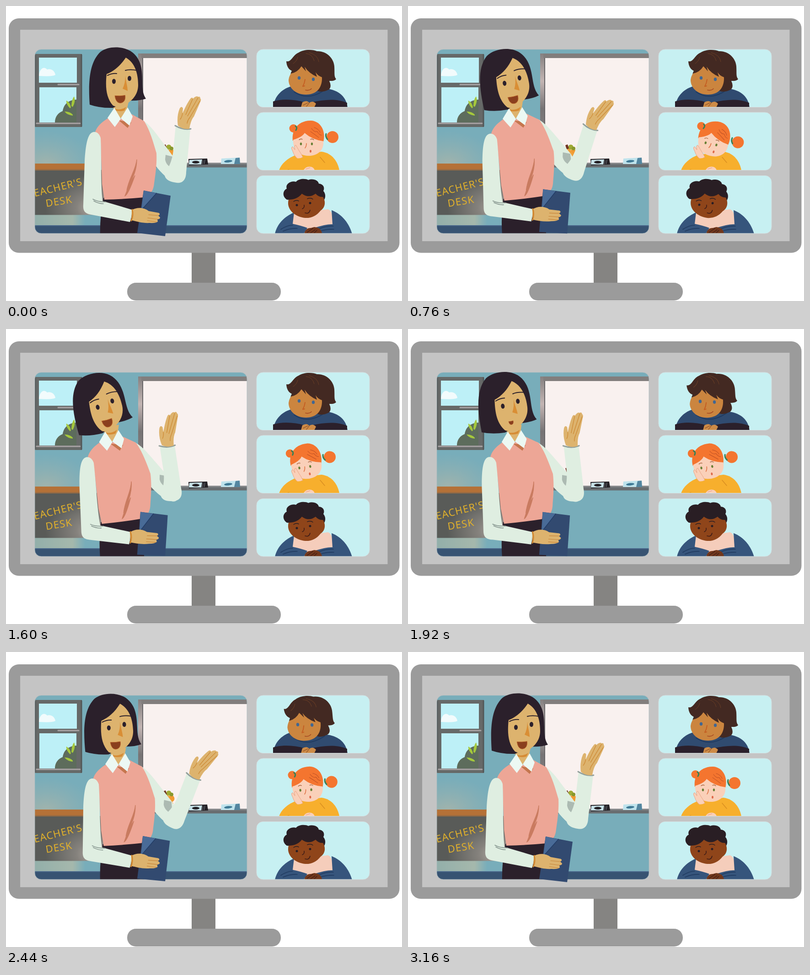
Recreate the animation shown at these times as an HTML page. Size 866 by 646 pixels, loop 3200 ms.

```html
<!DOCTYPE html>
<html lang="en">
<head>
<meta charset="utf-8">
<title>Online class</title>
<style>
  html, body { margin: 0; width: 100%; height: 100%; overflow: hidden; background: #fff; }
  svg { display: block; width: 866px; height: 646px; }
  .line { fill: none; stroke-linecap: round; stroke-linejoin: round; }
  .chalk { fill: #e0b02c; font: 500 22px "Noto Sans", "Open Sans", sans-serif; letter-spacing: 1.2px; }
  .skin { fill: #ddb36e; }
  .cloth { fill: #dfeee1; }
  .ink { fill: #2b202b; }
</style>
</head>
<body>
<svg viewBox="0 0 866 646">
  <defs>
    <clipPath id="room"><rect x="63" y="95" width="464" height="403" rx="14"/></clipPath>
    <clipPath id="tiles">
      <rect x="548" y="95" width="247" height="126.500" rx="14"/>
      <rect x="548" y="233" width="247" height="126.500" rx="14"/>
      <rect x="548" y="371.500" width="247" height="126.500" rx="14"/>
    </clipPath>
    <radialGradient id="deskFill" cx=".9" cy=".85" r=".75">
      <stop offset="0" stop-color="#b9b0a9"/><stop offset=".4" stop-color="#85827d"/>
      <stop offset="1" stop-color="#595b58"/>
    </radialGradient>
    <linearGradient id="edgeFill" x2="0" y2="1">
      <stop offset="0" stop-color="#858080"/><stop offset=".25" stop-color="#c3b5b3"/>
      <stop offset=".5" stop-color="#777475"/><stop offset="1" stop-color="#8b8788"/>
    </linearGradient>
    <radialGradient id="haze" cx=".2" cy="1" r=".9">
      <stop offset="0" stop-color="#b0b6a7" stop-opacity=".75"/>
      <stop offset="1" stop-color="#9fb2ac" stop-opacity="0"/>
    </radialGradient>
    <linearGradient id="under">
      <stop offset="0" stop-color="#93afaa"/><stop offset=".75" stop-color="#a5b8ac"/>
      <stop offset="1" stop-color="#78adba"/>
    </linearGradient>
  </defs>

  <!-- monitor -->
  <rect x="406" y="538" width="52" height="70" fill="#858482"/>
  <rect x="265" y="606" width="336" height="39" rx="19" fill="#9b9b9b"/>
  <rect x="6" y="27" width="854.500" height="513.500" rx="22" fill="#9b9b9b"/>
  <rect x="31" y="52" width="803.500" height="463" fill="#c4c4c4"/>

  <!-- classroom -->
  <g clip-path="url(#room)">
    <rect x="63" y="95" width="464" height="403" fill="#78adba"/>
    <rect x="63" y="265" width="120" height="82" fill="url(#haze)"/>
    <rect x="63" y="105" width="103" height="160" fill="#666968"/>
    <path d="M72 113H155V168H72ZM73 178H154V255H73Z" fill="#bdf0f7"/>
    <path d="M72 152C74 135 84 132 90 139C98 136 107 142 108 151Q100 155 72 153Z" fill="#f2fbfc"/>
    <path d="M107 255C107 242 114 234 124 230C126 218 133 207 152 205H154V255Z" fill="#5d6c5c"/>
    <path d="M143 219Q144 203 149 198Q153 208 146 221ZM140 224Q131 215 132 207Q140 211 142 222ZM146 240Q134 239 128 231Q140 231 146 238Z" fill="#a5c83c"/>
    <path d="M114 172H159M66 257H162" class="line" stroke="#a8a3a4" stroke-width="3"/>
    <path d="M165 107V263M64 108V262" class="line" stroke="#535757" stroke-width="3"/>

    <rect x="289" y="104" width="12" height="241" fill="url(#edgeFill)"/>
    <rect x="298" y="104" width="3" height="241" fill="#686668"/>
    <rect x="300" y="114" width="227" height="230" fill="#f9f1ef"/>
    <rect x="296" y="104" width="231" height="10" fill="#827e7d"/>
    <rect x="296" y="343.500" width="231" height="10" fill="#696d70"/>
    <path d="M296 345H527" stroke="#858789" stroke-width="3"/>

    <path d="M399 335L440 334L442 347L400 349Z" fill="#242126"/>
    <path d="M401 337L429 336L427 347H400Z" fill="#c8e2e8"/>
    <ellipse cx="415" cy="342" rx="8" ry="3" fill="#242126"/>
    <path d="M431 338L429 347M435 337L433 346" stroke="#77818a" stroke-width="1"/>
    <path d="M471 334L508 332L511 346H470Z" fill="#bfe3ec"/>
    <path d="M502 333L511 332L512 346H499Z" fill="#5386a0"/>
    <ellipse cx="486" cy="340" rx="9" ry="2.700" fill="#3f7995" transform="rotate(-5 486 340)"/>

    <circle cx="361" cy="321" r="7.500" fill="#f19a32"/>
    <path d="M347 314L352 310L366 332L360 335Z" fill="#f0a23c"/>
    <circle cx="356" cy="309" r="5.500" fill="#9eaa34"/><circle cx="362" cy="312" r="4" fill="#87972d"/>
    <path d="M344 305L349 303L352 312L347 314Z" fill="#6f3421"/>

    <rect x="63" y="457" width="110" height="24" fill="url(#under)"/>
    <rect x="63" y="359" width="152" height="98.500" fill="url(#deskFill)"/>
    <rect x="63" y="345" width="125" height="15" fill="#b57137"/>
    <path d="M63 358.500H186" stroke="#8f6a48" stroke-width="2"/>
    <text class="chalk" transform="translate(50 421) rotate(-14)">TEACHER'S</text>
    <text class="chalk" transform="translate(88 440) rotate(-9)">DESK</text>
    <rect x="63" y="480" width="464" height="18" fill="#375372"/>
    <path d="M63 481H527" stroke="#49678a" stroke-width="2"/>
    <g class="sway">
      <path class="ink" d="M213 420L302 414V510H206C205 480 207 450 213 420Z"/>
    </g>
  </g>
  <rect x="63" y="95" width="464" height="403" rx="14" fill="none" stroke="#aebdc0" stroke-width=".8"/>

  <!-- teacher -->
  <g class="sway">
    <path class="cloth" d="M298 250C314 258 330 282 343 299L366 330L388 372C386 386 377 389 369 385C353 379 340 366 328 351L310 310Z"/>
    <path d="M349 326L365 330L367 357Q350 350 348 336Z" fill="#acbab2"/>
    <path class="skin" d="M232 214L268 210L264 229L250 247L237 232Z"/>
    <path d="M235 224Q249 230 263 221L259 229Q247 232 237 228Z" fill="#d68c35"/>
    <path d="M223 246C210 254 199 263 195 276L207 300L210 390L215 424Q260 423 302 419C319 413 323 400 324 388C328 362 330 342 329 322C322 298 314 270 302 252L275 237L250 248Z" fill="#eda696"/>
    <path d="M246 250L266 267L274 255Z" fill="#c5764e"/>
    <path d="M237 223L222 245L238 265L251 247ZM266 222L251 246L270 262L277 242Z" fill="#ecf8f3"/>
    <path d="M286 336C284 359 269 376 264 404C270 386 286 369 286 336ZM282 371Q270 388 260 416Q267 414 282 371Z" fill="#c97b60" stroke="#c97b60" stroke-width="1.300"/>

    <g id="forearm">
      <path class="cloth" d="M371 263L403 270L394 364C394 382 384 389 373 387C357 385 346 379 347 367C358 352 366 332 367 304Z"/>
      <path d="M370 262Q387 272 404 269" class="line" stroke="#929f9b" stroke-width="3"/>
      <path class="skin" d="M376 262C374 249 375 236 380 224Q384 218 387 224L386 235C391 224 397 211 404 202Q408 199 409 203C412 199 418 196 420 199Q425 197 425 203Q428 204 424 212L411 242Q404 250 401 269Q387 271 376 262Z"/>
      <path class="line" d="M386 235Q385 243 381 248M408 204L393 238M420 201L397 241M424 208L402 244Q397 250 396 257" stroke="#cd8a35" stroke-width="1.300"/>
    </g>

    <path class="cloth" d="M191 276C178 278 174 306 172 340L169 436C168 451 175 455 187 457L271 473Q276 460 275 446L211 427C207 390 209 330 207 289C204 279 198 275 191 276Z"/>
    <path class="line" d="M190 423Q200 429 218 429M192 427Q203 433 213 433" stroke="#83938c" stroke-width="1.600"/>
    <path d="M301 404L360 415.500L348 504L287 497Z" fill="#324a70"/>
    <path d="M301 404L329 410L296 447Z" fill="#496b97"/>
    <path class="line" d="M329 410L296 447" stroke="#223c66" stroke-width="1.500"/>
    <path class="skin" d="M275 447C286 440 302 441 312 449L334 453Q339 456 333 459L337 463Q337 467 331 467L332 472Q327 476 315 475C299 476 286 472 274 469Z"/>
    <path class="line" d="M333 459L312 457M332 467L310 464M329 473L309 470" stroke="#c7843a" stroke-width="1.200"/>
    <path d="M276 446Q279 458 274 470" class="line" stroke="#d18730" stroke-width="3"/>
  </g>

  <g id="head">
    <path class="ink" d="M183 216C180 170 181 124 207 100C226 86 260 88 277 102C296 118 298 140 298 164C298 184 300 194 306 203Q292 208 268 207L234 223Q206 224 183 216Z"/>
    <path class="skin" d="M262 113C250 131 236 143 220 149C217 178 219 201 234 218Q247 225 259 217C276 208 289 194 289 173C289 148 282 124 262 113Z"/>
    <path class="line" d="M222 152Q232 147 242 148M261 141Q272 138 286 141" stroke="#2b202b" stroke-width="2"/>
    <ellipse class="ink" cx="236" cy="165" rx="4" ry="5.500"/>
    <ellipse class="ink" cx="270" cy="158.500" rx="4" ry="5.500"/>
    <path d="M261 152C262 165 266 176 266 186L255 181Q261 169 261 152Z" fill="#d98e35"/>
    <path id="mouth" d="M238 197Q249 198 260.500 196C262 207 257 213 249 213Q240 212 238 197Z" fill="#8a3f1e" stroke="#b9652c" stroke-width="1"/>
  </g>

  <!-- pupils -->
  <g clip-path="url(#tiles)">
    <rect x="548" y="95" width="247" height="403" fill="#c7f0f2"/>

    <path d="M584 222C587 196 605 180 627 175L694 180C724 182 744 196 747 222Z" fill="#304b70"/>
    <path class="line" d="M630 188Q660 209 697 184" stroke="#1e3a61" stroke-width="2"/>
    <path class="ink" d="M584 222V209C603 203 631 204 653 211L646 222ZM746 222V212C723 202 694 205 668 211L674 222Z"/>
    <path d="M648 211Q658 205 663 212Q671 206 678 214L674 222H645Z" fill="#cd8b47"/>
    <path class="line" d="M657 220L664 211M650 217L660 212" stroke="#8b4d24" stroke-width="1.200"/>
    <g id="pupil1">
      <path d="M613 121C624 124 627 107 640 102C652 94 671 95 680 99C701 98 717 115 718 132C719 148 717 154 722 160C718 165 709 164 707 164Q713 177 706 183Q694 189 684 187L622 154Q622 147 625 142Q614 137 613 121Z" fill="#432922"/>
      <path d="M623 148Q638 145 646 132L656 143L653 133Q662 147 680 155L677 145Q682 153 691 156C692 177 681 194 656 194C632 194 618 178 618 162Q619 154 623 148Z" fill="#cb853f"/>
      <path class="line" d="M656 104Q670 105 674 120M663 102Q682 107 684 122M628 126Q636 121 638 112" stroke="#6a3e25" stroke-width="1"/>
      <ellipse cx="641" cy="157.500" rx="3.200" ry="3.800" fill="#416792"/>
      <ellipse cx="672" cy="160.500" rx="3.200" ry="3.800" fill="#416792"/>
      <path class="line" d="M654 161Q653 169 649 176L653 175" stroke="#c45e22" stroke-width="2"/>
      <path class="line" d="M655 184Q663 186 668 181" stroke="#a54922" stroke-width="1.600"/>
    </g>

    <path d="M597 360C602 345 615 334 634 326L690 319C714 322 726 342 729 360Z" fill="#f7af2d"/>
    <path class="line" d="M687 331L697 343M617 358Q631 348 648 345" stroke="#d88d20" stroke-width="1.400"/>
    <g id="pupil2">
      <circle cx="628.500" cy="268" r="9" fill="#f4752f"/>
      <circle cx="714" cy="287" r="13" fill="#f4752f"/>
      <path d="M627 295C624 268 642 250 668 251C690 253 701 277 693 301Z" fill="#f4752f"/>
      <path d="M628 293Q648 287 653 278Q670 293 694 296C696 316 681 329 660 328C640 327 627 314 628 293Z" fill="#fad0b9"/>
      <path class="line" d="M633 263Q638 266 634 272M700 280Q698 286 703 292" stroke="#368057" stroke-width="3"/>
      <path class="line" d="M668 268Q674 277 681 275Q684 282 690 283M674 266Q684 269 687 277M666 275Q675 281 684 288" stroke="#bb4e24" stroke-width="1"/>
      <path class="line" d="M641 293Q645 290 648 292M666 292Q670 290 673 293" stroke="#9c5530" stroke-width="1.200"/>
      <ellipse cx="645" cy="302" rx="2.200" ry="3" fill="#677f34"/><ellipse cx="669" cy="302" rx="2.200" ry="3" fill="#677f34"/>
      <path class="line" d="M657 301Q657 307 654 311" stroke="#df7447" stroke-width="1.600"/>
      <ellipse cx="666" cy="318" rx="2" ry="3" fill="#df6949"/>
    </g>
    <path d="M627 318Q622 309 627 308L632 315Q629 304 634 305L641 317Q645 322 649 331L640 336Q630 329 627 318Z" fill="#fad0b9" stroke="#eaa486" stroke-width="1"/>
    <path d="M623 331Q635 336 649 332L655 346Q635 355 608 359Z" fill="#f7af2d"/>
    <path d="M650 360Q656 350 667 352Q674 354 675 360Z" fill="#fad0b9"/>
    <path class="line" d="M656 357L665 354" stroke="#e39a7d" stroke-width="1"/>

    <path d="M627 456L704 445Q716 449 717 483L662 492L626 481Z" fill="#f5cdbb"/>
    <path d="M588 499C593 477 609 461 630 452L627 477Q646 481 659 486L651 499ZM712 447C737 457 751 478 757 499H690L674 486Q701 477 714 478Z" fill="#36557c"/>
    <path class="line" d="M601 489Q615 480 627 480M606 493Q622 486 637 487M684 488Q701 481 716 482M690 492Q706 488 717 489" stroke="#213b60" stroke-width="1.700"/>
    <path d="M652 499Q655 485 667 486L674 484Q689 485 691 498Z" fill="#71371c"/>
    <path class="line" d="M658 496L671 487M666 497L676 490M674 497L680 491" stroke="#3e1c15" stroke-width="1.200"/>
    <g id="pupil3">
      <path d="M614 424C602 415 607 403 614 400C610 388 626 382 634 385C641 377 656 378 661 381C672 377 683 382 684 389C696 390 697 400 694 405C701 413 698 423 694 427L650 428Z" fill="#291e24"/>
      <path d="M618 424Q637 424 647 411Q662 422 677 411Q684 419 693 418C700 428 698 442 688 448C679 460 666 465 654 464C633 462 612 446 618 424Z" fill="#8f451a"/>
      <path class="line" d="M629 428Q635 424 640 427M659 422Q666 419 671 423" stroke="#291e24" stroke-width="1.500"/>
      <circle cx="636" cy="436" r="2.500" fill="#291e24"/><circle cx="665" cy="431.500" r="2.500" fill="#291e24"/>
      <path class="line" d="M652 436Q653 442 648 444M654 453Q663 456 665 447" stroke="#3c1b17" stroke-width="1.600"/>
    </g>
  </g>
  <g fill="none" stroke="#d4dfe0">
    <rect x="548" y="95" width="247" height="126.500" rx="14"/>
    <rect x="548" y="233" width="247" height="126.500" rx="14"/>
    <rect x="548" y="371.500" width="247" height="126.500" rx="14"/>
  </g>
</svg>
<script>
const LOOP = 3200, STEP = 40, HOLD = 120;
const get = id => document.getElementById(id);
const swaying = document.querySelectorAll('.sway');

// Each row: time, value. The arm turns relative to the body.
const body = [[0, 0], [80, 0], [760, -3.4], [1160, -4.2], [1640, -4.2], [2160, -3.3], [2640, 0], [3200, 0]];
const arm = [[0, 0], [80, 0], [720, 15.6], [1200, 5.8], [1600, -9.8], [1680, -10], [2160, -3.5], [2640, 27.2], [3160, 1.1], [3200, 0]];
const headTurn = [[0, 0], [80, 0], [760, -9], [1160, -12.5], [1640, -12.5], [2160, -2.5], [2680, -1.3], [3200, 0]];
const headX = [[0, 244], [80, 244], [760, 226], [1160, 218], [1640, 218], [2160, 225.5], [2680, 240.5], [3160, 244], [3200, 244]];
const headY = [[0, 209.5], [80, 209.5], [1160, 213], [1640, 213], [2160, 211], [2680, 210], [3200, 209.5]];
const nod1 = [[0, 0], [1640, 0], [2160, -5], [2680, -2.5], [2920, 0], [3200, 0]];
const nod2 = [[0, 0], [80, 0], [720, 11.5], [1200, 2.7], [1600, -7.4], [2160, -7.4], [2640, 0], [3200, 0]];
const nod3 = [[0, 0], [80, 0], [700, 2], [1200, 0], [3200, 0]];

// Smooth curve through the rows that never overshoots them.
function at(rows, t) {
  let i = 0;
  while (i < rows.length - 2 && t >= rows[i + 1][0]) i++;
  const slope = k => rows[k] && rows[k + 1]
    ? (rows[k + 1][1] - rows[k][1]) / (rows[k + 1][0] - rows[k][0]) : 0;
  const tangent = k => {
    const a = slope(k - 1), b = slope(k);
    return a * b > 0 ? 2 * a * b / (a + b) : 0;
  };
  const [t0, v0] = rows[i], [t1, v1] = rows[i + 1], d = t1 - t0, u = (t - t0) / d;
  const ease = u * u * (3 - 2 * u);
  return v0 + (v1 - v0) * ease
    + d * u * (1 - u) * ((1 - u) * tangent(i) - u * tangent(i + 1));
}

function pose(el, value) { el.setAttribute('transform', value); }
function turn(el, deg, x, y) { pose(el, `rotate(${deg} ${x} ${y})`); }

function draw(t) {
  swaying.forEach(el => turn(el, at(body, t), 250, 498));
  turn(get('forearm'), at(arm, t), 366, 364);
  pose(get('head'), `translate(${at(headX, t)} ${at(headY, t)}) rotate(${at(headTurn, t)}) translate(-244 -209.5)`);
  const open = ((1 + Math.cos(t * Math.PI / 400)) / 2) ** 2;
  pose(get('mouth'), `translate(249.5 203) scale(${.45 + .55 * open} ${.48 + .52 * open}) translate(-249.5 -203.5)`);
  turn(get('pupil1'), at(nod1, t), 660, 200);
  turn(get('pupil2'), at(nod2, t), 660, 330);
  turn(get('pupil3'), at(nod3, t), 656, 466);
}

function tick() {
  const t = Math.floor(performance.now() % LOOP / STEP) * STEP;
  draw(t < HOLD ? 0 : t);
  requestAnimationFrame(tick);
}
tick();
</script>
</body>
</html>
```
